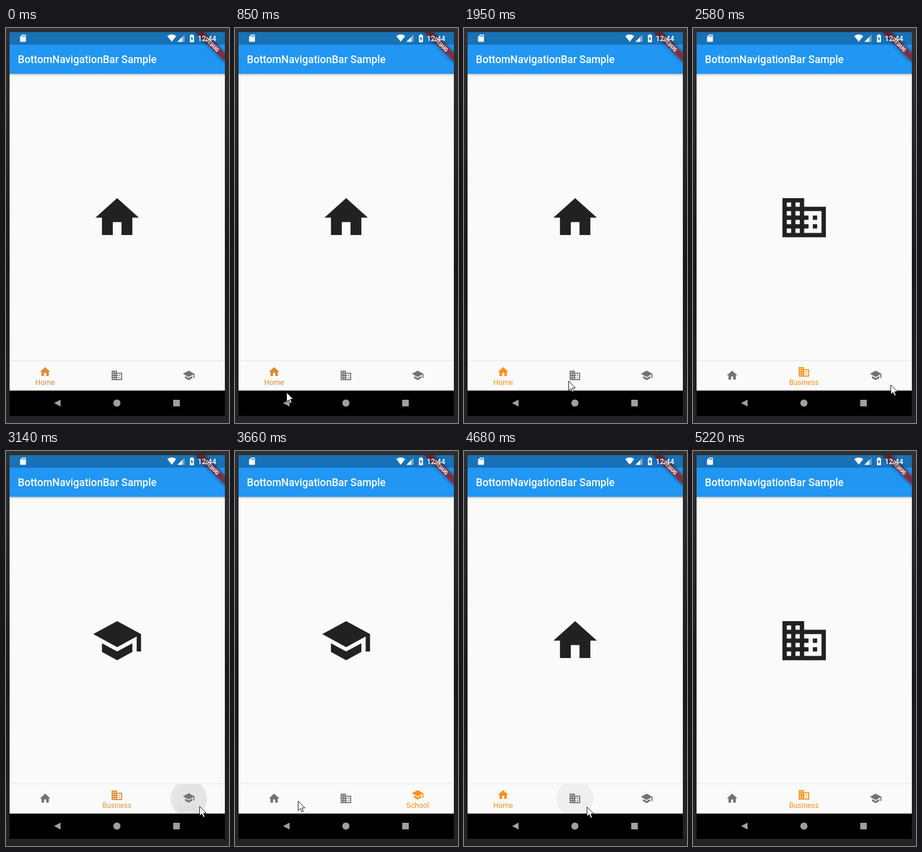
Animation, 376 px wide and 664 px high, one loop 6150 ms. Source, as an HTML page:

```html
<!DOCTYPE html>
<html lang="en">
<head>
<meta charset="utf-8">
<title>BottomNavigationBar Sample</title>
<style>
html, body { margin: 0; width: 100%; height: 100%; overflow: hidden; background: #222; }
svg { display: block; font-family: Roboto, sans-serif; }
.shadow { filter: blur(3.2px); }
</style>
</head>
<body>
<svg width="376" height="664" viewBox="0 0 376 664">
  <defs>
    <linearGradient id="desk" x2="0" y2="1">
      <stop offset="0" stop-color="#303030"/>
      <stop offset=".6" stop-color="#191919"/>
      <stop offset="1" stop-color="#242424"/>
    </linearGradient>
    <linearGradient id="shade" x2="0" y2="1">
      <stop offset="0" stop-opacity=".22"/>
      <stop offset="1" stop-opacity="0"/>
    </linearGradient>
    <clipPath id="screen"><rect x="6" y="7" width="363" height="645"/></clipPath>
    <clipPath id="tabBar"><rect x="6" y="560" width="363" height="49.5"/></clipPath>
    <path id="home" d="M10 20v-6h4v6h5v-8h3L12 3 2 12h3v8z"/>
    <path id="business" d="M12 7V3H2v18h20V7H12zM6 19H4v-2h2v2zm0-4H4v-2h2v2zm0-4H4V9h2v2zm0-4H4V5h2v2zm4 12H8v-2h2v2zm0-4H8v-2h2v2zm0-4H8V9h2v2zm0-4H8V5h2v2zm10 12h-8v-2h2v-2h-2v-2h2v-2h-2V9h8v10zm-2-8h-2v2h2v-2zm0 4h-2v2h2v-2z"/>
    <path id="school" d="M5 13.18v4L12 21l7-3.82v-4L12 17l-7-3.82zM12 3L1 9l11 6 9-4.91V17h2V9L12 3z"/>
  </defs>

  <rect width="376" height="664" fill="url(#desk)"/>
  <g clip-path="url(#screen)">
    <rect x="6" y="7" width="363" height="603" fill="#fafafa"/>
    <rect x="6" y="77" width="363" height="4" fill="url(#shade)"/>
    <rect x="6" y="7" width="363" height="70" fill="#2196f3"/>
    <text x="20" y="59.3" font-size="17.66" font-weight="500" fill="#fff">BottomNavigationBar Sample</text>
    <g transform="translate(369 7) rotate(45)">
      <rect class="shadow" x="-36" y="24.7" width="72" height="10.6" fill-opacity=".5"/>
      <rect x="-36" y="24.7" width="72" height="10.6" fill="#b71c1c" fill-opacity=".63"/>
      <text y="33.2" font-size="9" font-weight="900" fill="#fff" text-anchor="middle">DEBUG</text>
    </g>
    <rect x="6" y="7" width="363" height="21" fill-opacity=".25"/>
    <g fill="#fff">
      <path transform="translate(21.2 9.7) scale(.62)" d="M18 2h-8L4 8v12c0 1.1.9 2 2 2h12c1.1 0 2-.9 2-2V4c0-1.1-.9-2-2-2zm-6 6h-2V4h2v4zm3 0h-2V4h2v4zm3 0h-2V4h2v4z"/>
      <path transform="translate(271.8 9.2) scale(.64)" d="M12 21.5L23.64 7C23.2 6.66 18.7 3 12 3S.8 6.66.36 7z"/>
      <path d="M289 23.3L301 11.3V23.3z" opacity=".4"/>
      <path d="M289 23.3L297 15.3V23.3z"/>
      <path fill-rule="evenodd" d="M311 12h1v-1.3h3V12h1q1 0 1 1v10q0 1-1 1h-5q-1 0-1-1V13q0-1 1-1zM314 13.7l-3 4.8h1.9v3.8l3-5h-1.9z"/>
      <text x="323.2" y="22.3" font-size="12.4" font-weight="500">12:44</text>
    </g>

    <use id="page" transform="translate(143.5 274.9) scale(3.66)" fill="#212121"/>

    <rect x="6" y="558.5" width="363" height="1.5" fill="#ebebeb"/>
    <g clip-path="url(#tabBar)">
      <circle id="highlight" cy="584" r="31" fill="#bcbcbc"/>
      <circle id="splash" fill="#c8c8c8"/>
    </g>
    <g id="tabs" font-size="12.4" text-anchor="middle"></g>

    <rect x="6" y="609.5" width="363" height="43"/>
    <g fill="#a0a0a0">
      <path d="M81 630.5L92 624.7V636.3z"/>
      <circle cx="187" cy="630.5" r="6"/>
      <rect x="282" y="625" width="11" height="11"/>
    </g>
  </g>
  <path id="cursor" d="M.5.5V16.5L4.2 13 6.7 18.8 9.2 17.7 6.8 12H11.8z" fill="#fff" stroke="#000" stroke-width=".9"/>
</svg>

<script>
const LOOP = 6150, TICK = 80, PHASE = 20;
const HOLD = 150, FADE = 200, BAR_Y = 584;
const ORANGE = [249, 146, 24], DULL_ORANGE = [217, 140, 56], GRAY = [117, 112, 114];

const $ = id => document.getElementById(id);
const clamp = v => Math.min(1, Math.max(0, v));
const mix = (a, b, k) => a + (b - a) * k;
const set = (el, attrs) => { for (const k in attrs) el.setAttribute(k, attrs[k]); };

// Pointer strokes: start, end, and the tip position reached; it rests in between
const strokes = [
  [340, 660, 86.5, 612], [980, 1060, 64, 589], [1540, 1940, 176, 593],
  [2260, 2580, 333, 599.5], [2900, 3140, 326, 597], [3140, 3380, 106, 588],
  [3660, 3780, 56, 582], [4020, 4100, 127, 595], [4100, 4420, 207, 598],
  [4660, 5140, 196, 640]
];
const entry = [133, 648];

// Taps: press time, tab
const taps = [[1370, 0], [2130, 1], [2950, 2], [4010, 0], [4570, 1]]
  .map(([press, tab]) => ({ press, tab, release: press + HOLD }));

const tabs = ['Home', 'Business', 'School'].map((label, i) => {
  const make = name => $('tabs').appendChild(document.createElementNS('http://www.w3.org/2000/svg', name));
  const icon = '#' + label.toLowerCase(), use = make('use'), text = make('text');
  set(use, { href: icon });
  text.textContent = label;
  return { icon, x: 66 + 121 * i, use, text };
});

// cubic-bezier(.4, 0, .2, 1), solved by bisection
function ease(p) {
  let lo = 0, hi = 1, u = .5;
  for (let i = 0; i < 20; i++) {
    u = (lo + hi) / 2;
    const x = 1.2 * u * (1 - u) ** 2 + .6 * u * u * (1 - u) + u ** 3;
    if (x < p) lo = u; else hi = u;
  }
  return u * u * (3 - 2 * u);
}

const pointerAt = t => strokes.reduce(([x, y], [start, end, toX, toY]) => {
  const k = clamp((t - start) / (end - start));
  return [mix(x, toX, k), mix(y, toY, k)];
}, entry);

function drawPointer(t) {
  const visible = t >= strokes[0][0] && t < strokes.at(-1)[1];
  set($('cursor'), { opacity: +visible, transform: `translate(${pointerAt(t)})` });
}

function drawRipple(t) {
  const { press, release, tab } = taps.findLast(p => p.press <= t) || { press: 0, release: -FADE, tab: 0 };
  const fade = 1 - clamp((t - release) / FADE);
  const grow = clamp((t - press) / 200), spread = grow ** 2;
  const [x, y] = pointerAt(press), cx = tabs[tab].x;
  set($('highlight'), { cx, opacity: .4 * grow * fade });
  set($('splash'), {
    cx: mix(x, cx, spread), cy: mix(y, BAR_Y, spread), r: 31 * spread,
    opacity: .2 * grow * fade
  });
}

function drawTabs(t) {
  const done = taps.filter(p => p.release <= t), last = done.at(-1);
  const current = last?.tab ?? 0, previous = done.at(-2)?.tab ?? 0;
  const progress = last && current !== previous ? ease(clamp((t - last.release) / FADE)) : 1;
  const active = last ? ORANGE : DULL_ORANGE;
  set($('page'), { href: tabs[current].icon });
  tabs.forEach(({ x, use, text }, i) => {
    const w = i === current ? progress : i === previous ? 1 - progress : 0;
    const fill = `rgb(${GRAY.map((c, j) => Math.round(mix(c, active[j], w * w)))})`;
    set(use, { fill, transform: `translate(${x - 10.6} ${mix(BAR_Y, 578, w) - 10.6}) scale(.883)` });
    set(text, {
      fill, opacity: w,
      transform: `translate(${x} ${mix(605, 599.6, w)}) scale(${mix(12 / 14, 1, w)})`
    });
  });
}

function frame(now) {
  const t = Math.floor((now % LOOP - PHASE) / TICK) * TICK + PHASE;
  drawTabs(t);
  drawRipple(t);
  drawPointer(t);
  requestAnimationFrame(frame);
}
frame(0);
</script>
</body>
</html>
```
